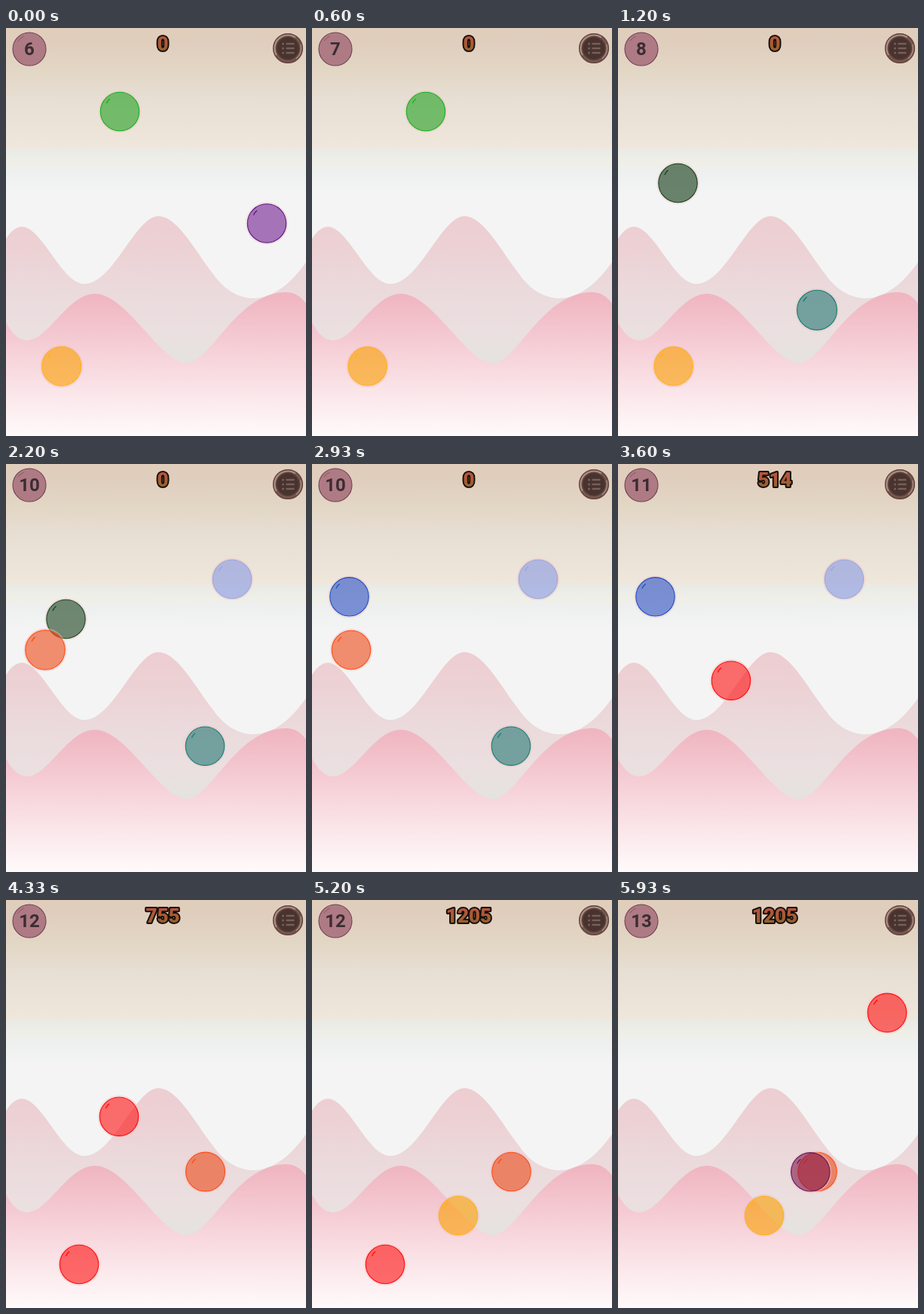
An HTML page with a canvas for the animation above (5.99 s loop, 398x542 px).

```html
<!DOCTYPE html>
<html lang="en">
<head>
<meta charset="utf-8">
<title>Bubbles</title>
<style>
html, body { margin: 0; width: 100%; height: 100%; overflow: hidden; background: #f4f4f4; }
canvas { display: block; width: 398px; height: 542px; }
</style>
</head>
<body>
<canvas id="stage" width="398" height="542"></canvas>
<script>
const W = 398, H = 542, LOOP = 5990;
const ctx = document.getElementById('stage').getContext('2d');
const TAU = Math.PI * 2;
const clamp = v => Math.max(0, Math.min(1, v));
const easeOut = p => 1 - (1 - p) * (1 - p);

const FADE = 200;

// x, y, fill rgb, outline, birth, death, entry scale
const bubbles = [
  [151, 111, '35,162,34', '#17b01c', -900, 700, 1],
  [346, 259.5, '114,31,144', '#5a1480', -900, 340, 1],
  [73.7, 449.3, '252,159,1', '#ffb01a', -40, 1660, 1.02],
  [79.5, 206, '14,56,17', '#123f16', 690, 2190, 1.03],
  [264, 374.7, '37,120,118', '#12806f', 1200, 3040, 1.03],
  [300, 153, '137,153,227', '#9ba5da', 1650, 3850, 1.3],
  [52, 247, '237,74,22', '#ff4a10', 2200, 3270, 1.02],
  [49.5, 176.3, '46,80,196', '#1f4bc0', 2650, 3660, 1.8],
  [150, 287.7, '255,18,17', '#ff0808', 3200, 4500, 1.8],
  [97, 484, '255,18,17', '#ff0808', 3690, 5700, 1.03],
  [264.5, 361, '235,74,26', '#ff4a10', 4220, 9000, 1.03],
  [194, 419.2, '252,159,1', '#ffb01a', 4710, 9000, 1.02],
  [357, 149.8, '255,18,17', '#ff0808', 5240, 9000, 1.8],
  [255.3, 361.3, '130,22,76', '#5f1a5c', 5690, 9000, 1.8]
].map(([x, y, rgb, line, born, dies, from]) => ({ x, y, rgb, line, born, dies, from }));

const missTimes = [340, 700, 1660, 2200, 3270, 3850, 5700];
const gains = [[3010, 590, 514], [3710, 600, 241], [4500, 670, 450]];

function gradient(y0, y1, stops) {
  const g = ctx.createLinearGradient(0, y0, 0, y1);
  for (const [y, color] of stops) g.addColorStop((y - y0) / (y1 - y0), color);
  return g;
}

const sky = gradient(0, H, [
  [0, '#e0cdbc'], [25, '#e0cfbe'], [60, '#e3d7c6'], [95, '#e7dfd4'],
  [130, '#ece3d8'], [158, '#efe7dc'], [163, '#e9ebe7'], [178, '#efefe7'],
  [190, '#eef0f0'], [222, '#f4f4f4'], [H, '#f4f4f4']
]);
const backFill = gradient(250, 450, [
  [250, '#edcdd1'], [300, '#ecd2d5'], [350, '#ebdadc'], [400, '#ebdfe0'], [445, '#e4e3df']
]);
const frontFill = gradient(350, H, [
  [350, '#efb4bf'], [385, '#f2c0ca'], [430, '#f6d1d8'], [480, '#fae4e8'], [H, '#fffafa']
]);
const backWave = new Path2D('M0 280C7 269 14 264 21 264C48 264 74 340 104 340' +
  'C142 340 172 250 202 250C228 250 252 298 275 327C290 349 310 359 328 359' +
  'C360 359 385 330 398 311V542H0Z');
const frontWave = new Path2D('M0 391C8 407 18 415 28 415C56 415 82 353 118 353' +
  'C160 353 205 445 240 445C272 445 305 351 372 351C382 351 391 356 398 366V542H0Z');

function disc(x, y, r, fill, line, width = 1) {
  ctx.beginPath();
  ctx.arc(x, y, r, 0, TAU);
  if (fill) { ctx.fillStyle = fill; ctx.fill(); }
  if (line) { ctx.strokeStyle = line; ctx.lineWidth = width; ctx.stroke(); }
}

function arc(x, y, r, a, b, line, width) {
  ctx.beginPath();
  ctx.arc(x, y, r, a, b);
  ctx.strokeStyle = line;
  ctx.lineWidth = width;
  ctx.stroke();
}

function drawScene() {
  ctx.fillStyle = sky;
  ctx.fillRect(0, 0, W, H);
  ctx.fillStyle = backFill;
  ctx.fill(backWave);
  ctx.fillStyle = frontFill;
  ctx.fill(frontWave);
}

function drawBubble(b, t) {
  if (t < b.born || t >= b.dies + FADE) return;
  const grow = easeOut(clamp((t - b.born) / 240));
  const shown = b.from > 1.1 ? grow : 1;
  const scale = b.from + (1 - b.from) * grow;
  ctx.save();
  ctx.globalAlpha = shown * (1 - clamp((t - b.dies) / FADE));
  ctx.translate(b.x, b.y);
  ctx.scale(scale, scale);
  disc(0, 0, 27.2, null, 'rgba(238,190,196,.45)', 1.8);
  disc(0, 0, 25.7, `rgba(${b.rgb},.6)`, b.line, 1.1);
  ctx.lineCap = 'round';
  arc(-5, -6, 13.5, 3.55, 4.05, b.line, 1.3);
  ctx.restore();
}

function drawMisses(t) {
  disc(31, 28, 22, '#ae7a84', '#71414f', 1.1);
  arc(31, 28, 18.5, 3.75, 4.3, '#8d5665', 1);
  ctx.font = '700 24px Roboto, Arial, sans-serif';
  ctx.textAlign = 'center';
  ctx.fillStyle = '#3b2d34';
  ctx.fillText(6 + missTimes.filter(m => t >= m).length, 31, 35.5);
}

function drawMenu() {
  disc(374, 27, 19.2, '#765950', '#66463f', 1.8);
  arc(374, 27, 17.6, 2.6, 5.3, '#ad9187', 2);
  arc(374, 27, 17.6, -0.3, 0.9, '#a1847a', 1.8);
  disc(374, 27, 15.2, '#49332f', '#5b403a', 1.5);
  ctx.fillStyle = '#78605a';
  for (const y of [21, 27, 33]) {
    disc(367.5, y, 1.5, '#78605a');
    ctx.fillRect(371.5, y - 1.2, 11, 2.4);
  }
}

function drawScore(t) {
  let score = 0;
  for (const [start, length, points] of gains) {
    score += points * easeOut(clamp((t - start) / length));
  }
  const text = String(Math.round(score));
  ctx.font = '900 26px Roboto, Arial, sans-serif';
  ctx.textAlign = 'center';
  ctx.lineJoin = 'round';
  ctx.strokeStyle = '#15100c';
  ctx.lineWidth = 4;
  ctx.strokeText(text, 208, 29.5);
  ctx.fillStyle = scoreFill;
  ctx.fillText(text, 208, 29.5);
}

const scoreFill = gradient(10, 30, [[10, '#b9523f'], [20, '#ad5a35'], [30, '#98602a']]);

function frame(now) {
  const t = now % LOOP;
  drawScene();
  for (const b of bubbles) drawBubble(b, t);
  drawMisses(t);
  drawMenu();
  drawScore(t);
}

const begin = performance.now();
function tick() {
  frame(performance.now() - begin);
  requestAnimationFrame(tick);
}
tick();
</script>
</body>
</html>
```
